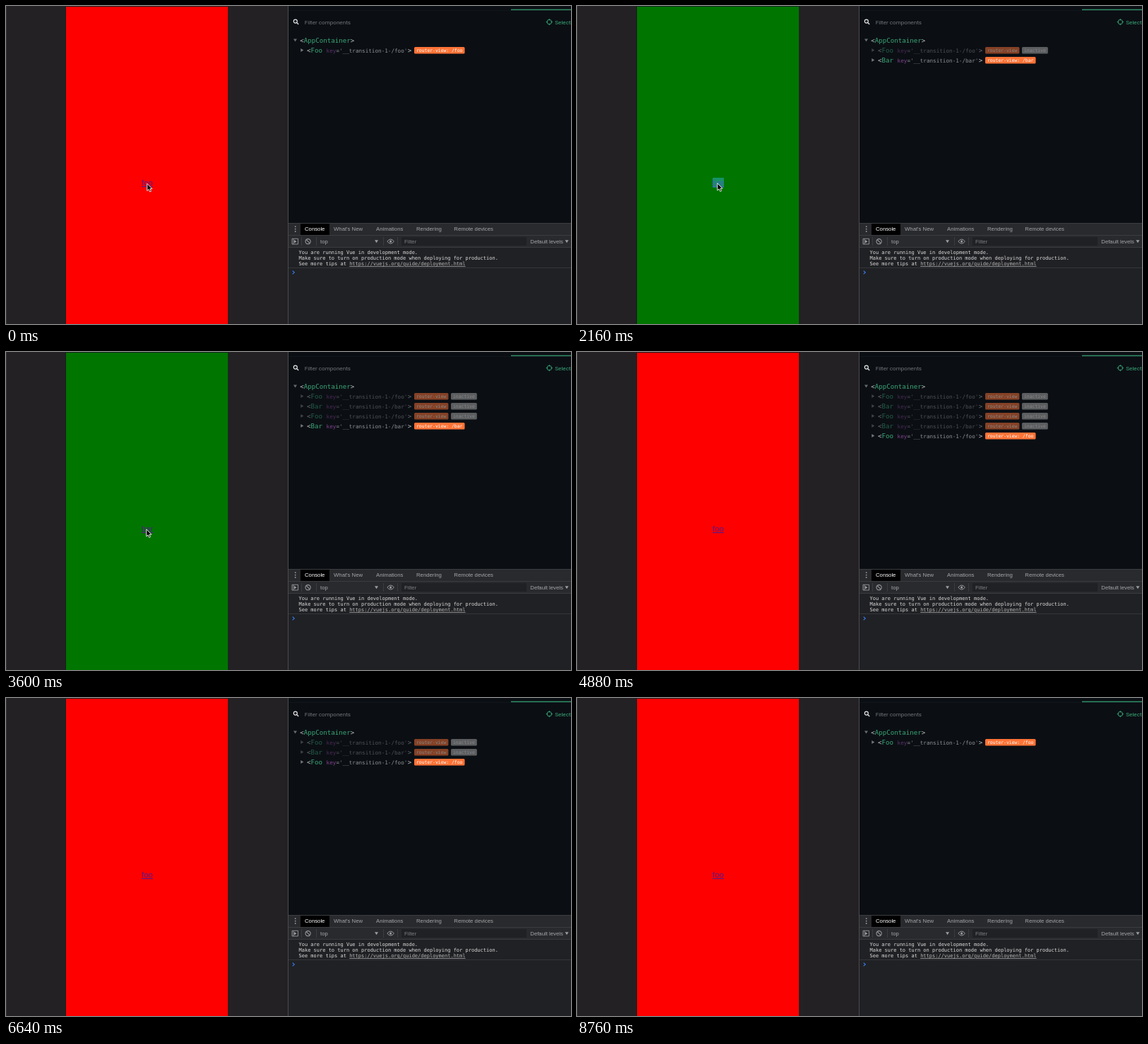
Animation of 800x450 px, one loop 8840 ms. Source, as an HTML page:

```html
<!DOCTYPE html>
<html lang="en">
<head>
<meta charset="utf-8">
<title>Page transitions</title>
<style>
  html, body { margin: 0; width: 100%; height: 100%; overflow: hidden; background: #232124; }
  svg { display: block; width: 800px; height: 450px; }
  text { white-space: pre; }
  .mono { font-family: "DejaVu Sans Mono", monospace; }
  .ui { font: 7.75px "Liberation Sans", sans-serif; fill: #a4a6a9; }
  .panel { font: 8.1px Roboto, sans-serif; }
  .tag { font-size: 9.15px; }
  .attr { font-size: 7.64px; }
  .badge { font-size: 6.4px; }
  .log { font-size: 7px; fill: #dcdcdc; }
  .link { font: 11.4px "Liberation Sans", sans-serif; fill: #551a8b; text-anchor: middle; text-decoration: underline; }
  .line { fill: none; stroke: #96989b; }
</style>
</head>
<body>
<svg viewBox="0 0 800 450">
  <defs><clipPath id="screen"><rect x="85" y="1" width="229.5" height="449"/></clipPath></defs>
  <rect width="800" height="450" fill="#232124"/>
  <path d="M.5 0V450" stroke="#353437"/>
  <rect x="84.5" y=".5" width="230.5" height="452" fill="none" stroke="#17201f"/>
  <g clip-path="url(#screen)"><g id="lower"></g><g id="upper"></g></g>
  <rect id="tap" x="192" y="243" width="16" height="14" rx="1" fill="#33b5e5" opacity=".45"/>

  <rect x="400" width="400" height="307" fill="#0b0f14"/>
  <path d="M400 6.5H800" stroke="#10161b"/>
  <path d="M715 5.3H800" stroke="#2f8a62" stroke-width="1.4"/>
  <g fill="none" stroke="#e4e6e7" stroke-width="1.2">
    <circle cx="409.8" cy="21.6" r="2.5"/><path d="M411.7 23.5L414.2 26"/>
  </g>
  <text class="panel" x="422.7" y="25.6" fill="#6f7376">Filter components</text>
  <g fill="none" stroke="#3ba776" stroke-width=".9">
    <circle cx="769.3" cy="22.6" r="3.3"/>
    <path d="M769.3 18V20.5M769.3 24.7V27.2M764.7 22.6H767.2M771.4 22.6H773.9"/>
  </g>
  <text class="panel" x="777.3" y="25.6" fill="#3ba776">Select</text>
  <path d="M407 46.5H412L409.5 50.5Z" fill="#666b6e"/>
  <text class="mono tag" x="416.3" y="52" fill="#bfc3c5">&lt;<tspan fill="#3ba776">AppContainer</tspan>&gt;</text>
  <g id="tree"></g>

  <rect x="400" y="307" width="400" height="143" fill="#202124"/>
  <rect x="400" y="307" width="400" height="34" fill="#292a2d"/>
  <path d="M400 307.5H800M400 324.5H800M400 341.5H800" stroke="#3b3c3f"/>
  <path d="M400 370.5H800" stroke="#34353a"/>
  <rect x="417" y="308" width="41" height="16" fill="#000"/>
  <g id="tabs" class="ui"></g>
  <g fill="#9b9da0">
    <circle cx="409.7" cy="312.2" r=".9"/><circle cx="409.7" cy="315.6" r=".9"/><circle cx="409.7" cy="319" r=".9"/>
    <path d="M408 331L411.5 333.2L408 335.4Z"/>
    <path d="M522 331.2H527L524.5 335.2Z"/><path d="M791.5 331.2H796.5L794 335.2Z"/>
    <circle cx="544.6" cy="333.1" r="1.6"/>
  </g>
  <g class="line">
    <path d="M405 329.3H413.5V337H405ZM407 329.3V337" stroke-width=".9"/>
    <circle cx="427.6" cy="333.2" r="3.6" stroke-width="1.1"/><path d="M425.2 330.7L430 335.7" stroke-width="1.1"/>
    <path d="M539.8 333.1Q544.6 327 549.4 333.1Q544.6 339.2 539.8 333.1Z" stroke-width="1"/>
  </g>
  <path d="M418.5 327V339M439.5 327V339M534.5 327V339M554.5 327V339" stroke="#414246" stroke-width=".8"/>
  <rect x="560" y="327" width="177" height="12" fill="#202124"/>
  <text class="ui" x="445" y="335.7">top</text>
  <text class="ui" x="564" y="335.7" style="fill:#7c7e82">Filter</text>
  <text class="ui" x="742.3" y="335.7">Default levels</text>
  <g class="mono log">
    <text x="414.5" y="350.7">You are running Vue in development mode.</text>
    <text x="414.5" y="359">Make sure to turn on production mode when deploying for production.</text>
    <text x="414.5" y="367.3">See more tips at <tspan text-decoration="underline" fill="#b8b8b8">https://vuejs.org/guide/deployment.html</tspan></text>
  </g>
  <path d="M405.7 374.7L408.3 377L405.7 379.3" fill="none" stroke="#367cf1" stroke-width="1.1"/>
  <path d="M399.5 0V450" stroke="#4a4b4d"/>
  <path id="cursor" d="M0 0V10.2L2.3 8.1L4 11.7L5.7 10.9L4.1 7.4H7.2Z" fill="#000" stroke="#fff" stroke-width=".9"/>
</svg>
<script>
const LOOP = 8840, SLIDE = 400, WIDTH = 229.5, PARALLAX = 42;
// Each navigation: start time and resulting history depth.
const STEPS = [[-1000, 1], [1080, 2], [2220, 3], [3000, 4], [3880, 5], [5080, 4], [5980, 3], [6800, 2], [7500, 1]];
const $ = id => document.getElementById(id);
const clamp = v => Math.min(1, Math.max(0, v));
const nameOf = depth => depth % 2 ? 'foo' : 'bar';

function ease(x) {
  const curve = (a, b, s) => 3 * a * s * (1 - s) ** 2 + 3 * b * s * s * (1 - s) + s ** 3;
  let lo = 0, hi = 1;
  for (let i = 0; i < 20; i++) {
    const mid = (lo + hi) / 2;
    if (curve(.25, .25, mid) < x) lo = mid; else hi = mid;
  }
  return x <= 0 ? 0 : x >= 1 ? 1 : curve(.1, 1, lo);
}

$('tabs').innerHTML = [['Console', 423], ["What's New", 464], ['Animations', 524], ['Rendering', 581], ['Remote devices', 634.3]]
  .map(([label, x], i) => `<text x="${x}" y="318.4"${i ? '' : ' style="fill:#fff"'}>${label}</text>`).join('');

function badge(x, y, label, fill) {
  const width = label.length * 3.853 + 6;
  return `<rect x="${x}" y="${y - 8}" width="${width}" height="9.5" rx="1.6" fill="${fill}"/>
    <text class="mono badge" x="${x + 3}" y="${y - 1.2}" fill="#fff">${label}</text>`;
}

function row(index, depth) {
  const y = 66 + index * 14, route = nameOf(index + 1), active = index === depth - 1;
  const title = route[0].toUpperCase() + route.slice(1);
  const badges = active ? badge(578, y, 'router-view: /' + route, '#ff7336')
    : badge(578, y, 'router-view', '#ff7336') + badge(630, y, 'inactive', '#aaa');
  return `<g opacity="${active ? 1 : .5}">
    <path d="M417.3 ${y - 6}V${y - 1}L421.3 ${y - 3.5}Z" fill="#74797c"/>
    <text class="mono tag" x="426" y="${y}" fill="#bfc3c5">&lt;<tspan fill="#3ba776">${title}</tspan></text>
    <text class="mono attr" x="453.6" y="${y}" fill="#8e9194"><tspan fill="${depth > 1 ? '#81418f' : '#5b3068'}">key</tspan>='__transition-1-/${route}'</text>
    <text class="mono tag" x="568.8" y="${y}" fill="#bfc3c5">&gt;</text>${badges}</g>`;
}

let shownDepth = 0;
function drawTree(depth) {
  if (depth === shownDepth) return;
  shownDepth = depth;
  $('tree').innerHTML = Array.from({ length: depth }, (_, i) => row(i, depth)).join('');
}

function drawPage(id, depth, x) {
  const page = $(id), route = nameOf(depth);
  if (page.dataset.route !== route) {
    page.dataset.route = route;
    page.innerHTML = `<rect x="85" y="1" width="${WIDTH}" height="449" fill="${route === 'foo' ? '#f00' : '#007600'}"/>
      <text class="link" x="200" y="254">${route}</text>`;
  }
  page.setAttribute('transform', `translate(${x} 0)`);
}

function drawCursor(t) {
  const leave = clamp((t - 4260) / 340), glide = leave * leave * (3 - 2 * leave);
  const settle = clamp(t / 900);
  const x = 199.8 - settle - 135 * glide, y = 251.3 - .5 * settle - 266 * glide;
  $('cursor').setAttribute('transform', `translate(${x} ${y})`);
  $('cursor').style.display = leave < 1 ? '' : 'none';
}

function render(t) {
  const current = STEPS.findLastIndex(([start]) => start <= t);
  const [start, depth] = STEPS[current];
  const previous = current ? STEPS[current - 1][1] : 2;
  const progress = ease((t - start) / SLIDE);
  const away = depth > previous ? 1 - progress : progress;
  const top = Math.max(depth, previous);
  drawPage('lower', top - 1, -PARALLAX * (1 - away));
  drawPage('upper', top, WIDTH * away);
  drawTree(depth);
  drawCursor(t);
  const tapped = STEPS.some(([at, to], i) => i && to > STEPS[i - 1][1] && t >= at - 100 && t < at);
  $('tap').style.display = tapped ? '' : 'none';
}

const origin = performance.now();
function frame() {
  render((performance.now() - origin) % LOOP);
  requestAnimationFrame(frame);
}
frame();
</script>
</body>
</html>
```
